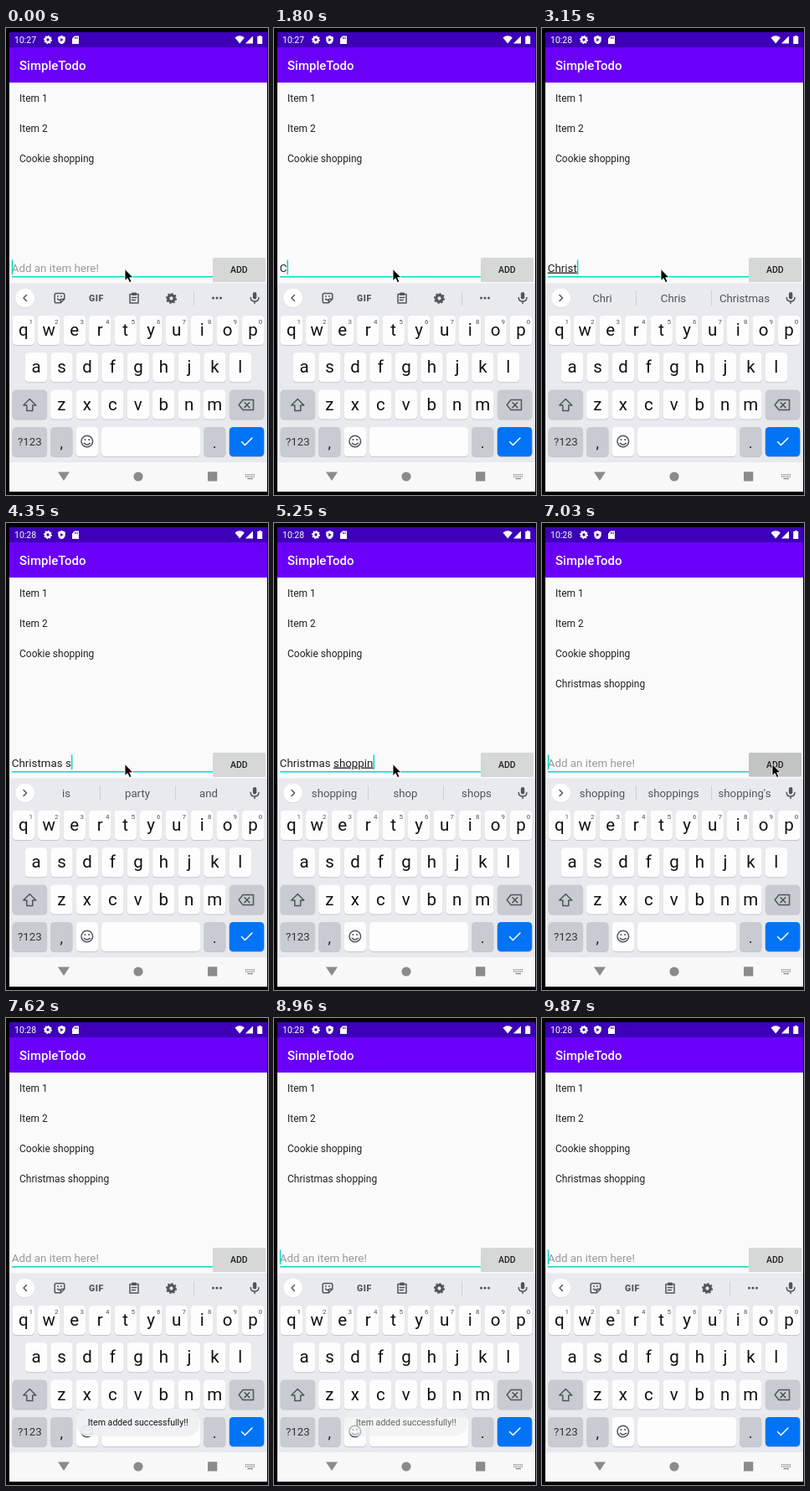
An HTML page for the animation above (9970 ms loop, 313 by 557 pixels).

```html
<!DOCTYPE html>
<html lang="en">
<head>
<meta charset="utf-8">
<title>SimpleTodo</title>
<style>
html, body { margin: 0; width: 100%; height: 100%; overflow: hidden; background: #000; }
svg { display: block; width: 100vw; height: 100vh; font-family: Roboto, "Liberation Sans", sans-serif; }
.mid { text-anchor: middle; }
.line { fill: none; stroke: #50555a; stroke-width: 1.5; stroke-linecap: round; stroke-linejoin: round; }
.u { text-decoration: underline; }
</style>
</head>
<body>
<svg id="stage" viewBox="0 0 313 557"></svg>
<script>
const LOOP = 9970;
const GREY = '#50555a';
const stage = document.getElementById('stage');

// Markup helpers
const rect = (x, y, w, h, fill, r = 0, more = '') =>
  `<rect x="${x}" y="${y}" width="${w}" height="${h}" rx="${r}" fill="${fill}" ${more}/>`;
const text = (x, y, size, s, fill = '#202124', more = '') =>
  `<text x="${x}" y="${y}" font-size="${size}" fill="${fill}" ${more}>${s}</text>`;
const mid = (x, y, size, s, fill, more = '') => text(x, y, size, s, fill, 'class="mid" ' + more);
const path = (d, fill, more = '') => `<path d="${d}" fill="${fill}" ${more}/>`;
const line = (d, more = '') => `<path class="line" d="${d}" ${more}/>`;
const dot = (x, y, r, fill) => `<circle cx="${x}" cy="${y}" r="${r}" fill="${fill}"/>`;
const group = (id, s, more = '') => `<g id="${id}" ${more}>${s}</g>`;
const gear = (x, y, r, color) =>
  `<g fill="none" stroke="${color}"><circle cx="${x}" cy="${y}" r="${r * 0.58}" stroke-width="${r * 0.5}"/>` +
  `<circle cx="${x}" cy="${y}" r="${r * 0.88}" stroke-width="${r * 0.26}" pathLength="16" stroke-dasharray="1"/></g>`;
const key = (x, y, w, fill = '#fdfdfd') =>
  rect(x, y + 1, w, 35, '#c3c6ca', 4.5) + rect(x, y, w, 35, fill, 4.5);

function statusBar() {
  return rect(4, 5, 308, 18, '#3d00b8') +
    text(10, 18, 10.5, '10:27', '#fff', 'id="clock"') +
    gear(50, 14, 5, '#fff') +
    path('M66.5 9l4.3 1.7v3q0 4-4.3 5.6q-4.3-1.6-4.3-5.6v-3z', '#fff') +
    path('M65.2 12l3.4 2.1-3.4 2.1z', '#3d00b8') +
    path('M82 9.5h5v9.5h-8v-6.5z', '#fff') +
    path('M82.3 11v2m1.5-2v2m1.5-2v2', 'none', 'stroke="#3d00b8" stroke-width=".8"') +
    path('M273.5 11.5q5.7-4.4 11.4 0l-5.7 7z', '#fff') +
    path('M295 9.5v9h-9z', '#fff') +
    path('M302 9h2.5v1h1.7v9h-6v-9h1.8z', '#fff');
}

function app() {
  return rect(4, 5, 308, 548, '#fafafa') + statusBar() +
    rect(4, 23, 308, 42, '#6a00f7') +
    rect(4, 65, 308, 1.5, '#000', 0, 'opacity=".09"') +
    text(16, 50, 15, 'SimpleTodo', '#fff', 'font-weight="500"') +
    ['Item 1', 'Item 2', 'Cookie shopping', 'Christmas shopping'].map((s, i) =>
      text(16, 87.6 + 36 * i, 12, s, '#212121', i === 3 ? 'id="added"' : '')).join('') +
    rect(7, 296, 241, 1.5, '#03dac5') +
    text(6.8, 290.5, 13.35, 'Add an item here!', '#999', 'id="hint"') +
    text(6.8, 290.5, 13.35, '', '#212121', 'id="entry"') +
    rect(7, 276.5, 1.5, 17.5, '#03dac5', 0, 'id="caret"') +
    rect(247, 275, 63, 28, '#bbb', 1.5, 'opacity=".6"') +
    rect(247, 274, 63, 28, '#d6d7d7', 1.5, 'id="button"') +
    mid(278.3, 291.7, 10.5, 'ADD', '#212121', 'font-weight="500"');
}

function toolbar() {
  const tools =
    line('M24.5 318.5l-3.5 3.5 3.5 3.5') +
    line('M60 316.5h8q1.8 0 1.8 1.8v5l-4.5 4.5h-5.3q-1.8 0-1.8-1.8v-7.700q0-1.800 1.800-1.800zM69.5 323.300h-2.500q-1.700 0-1.700 1.700v2.500M61.500 323q1.500 2 3.500 1') +
    dot(62, 320, 0.9, GREY) + dot(66, 320, 0.9, GREY) +
    mid(108, 325.8, 10.5, 'GIF', GREY, 'font-weight="900" letter-spacing=".6"') +
    line('M148 317.500h10v10.500h-10zM150.300 321.500h5.400M150.300 324.500h4') +
    rect(150, 315.5, 6, 3.5, GREY, 1) +
    gear(197.5, 322.5, 6.5, GREY) +
    rect(224, 314, 1, 17, '#cdd0d4') +
    [247.5, 252, 256.5].map(x => dot(x, 322, 1.5, GREY)).join('');
  const words =
    line('M21 318.5l3.500 3.500-3.500 3.500') +
    [112, 202].map(x => rect(x, 313, 1, 18, '#cdd0d4')).join('') +
    [72, 157, 242].map(x => mid(x, 327, 13.2, '', GREY, 'data-word')).join('');
  return dot(22.7, 322.7, 11.3, '#d5d8dc') + dot(22.7, 322, 11.3, '#fff') +
    group('tools', tools) + group('words', words) +
    rect(294.9, 315, 4.4, 8.5, GREY, 2.2) +
    line('M292.300 321.500q0 4.500 4.800 4.500t4.800-4.500M297.100 326v2.500');
}

function keyboard() {
  const dark = '#c8ccd2';
  let s = rect(4, 304.5, 308, 213.5, '#e8eaed') + toolbar();
  ['qwertyuiop', 'asdfghjkl', 'zxcvbnm'].forEach((row, r) => {
    const y = 343 + 44.3 * r;
    [...row].forEach((ch, i) => {
      const x = [20.8, 36, 66.3][r] + 30.48 * i;
      s += key(x - 13.2, y, 26.4) + mid(x, y + 24, 20.5, ch, '#111');
      if (!r) s += mid(x + 9, y + 9.5, 8, (i + 1) % 10, GREY);
    });
  });
  s += key(7.6, 431.6, 41.5, dark) + key(266.8, 431.6, 41.5, dark) +
    line('M28.300 442.500l7.500 7.500h-4v6.500h-7v-6.500h-4z') +
    line('M283 443.500h12.500v12h-12.500l-4.800-6zM285 446.800l5.800 5.800m0-5.800l-5.800 5.800') +
    key(7.6, 476, 41.5, dark) + mid(28.3, 498.3, 13.3, '?123', '#333') +
    key(53.1, 476, 26.4, dark) + mid(66.3, 501, 18, ',', '#222') +
    key(83.6, 476, 26.4) +
    '<circle class="line" cx="96.800" cy="493" r="6.800"/>' +
    line('M93.300 495.300q3.500 3.500 7 0') +
    dot(94.4, 491, 1.1, GREY) + dot(99.2, 491, 1.1, GREY) +
    key(114.1, 476, 118) +
    key(236, 476, 26.4, dark) + mid(249.2, 501, 18, '.', '#222') +
    key(266.8, 476, 41.5, '#0074f5') +
    line('M281.500 493.500l4 4 8.500-8.500', 'style="stroke:#fff"');
  return s;
}

function navBar() {
  const c = '#8b8b8b';
  let keys = '';
  for (let i = 0; i < 10; i++) keys += rect(286 + (i % 5) * 2.4, 532 + (i / 5 | 0) * 2.4, 1.4, 1.4, c);
  return rect(4, 518, 308, 35, '#f8f8f9') +
    path('M62 529.500h14l-7 10.500z', c) + dot(158, 535, 5.6, c) +
    rect(241, 529.3, 11.3, 11.3, c, 0.5) + keys + rect(288.5, 536.8, 6.5, 1.4, c);
}

const toast = rect(84, 466, 147, 33, '#eef0f1', 15, 'opacity=".9"') +
  mid(157.7, 485.5, 10.6, 'Item added successfully!!', '#151515');

stage.innerHTML = app() + keyboard() + navBar() + group('toast', toast) +
  group('mouse', path('M0 0v14l3.200-2.900 2.300 5 2.500-1.100-2.300-4.800h4.300z', '#000', 'stroke="#fff" stroke-width=".9"'));

const $ = id => document.getElementById(id);
const slots = [...document.querySelectorAll('[data-word]')];
const show = (id, on) => $(id).setAttribute('visibility', on ? 'visible' : 'hidden');

// Timelines: [start, value]
const typing = [
  [0, ''], [1800, 'C'], [2100, 'Ch'], [2250, 'Chr'], [2400, 'Chri'], [3150, 'Christ'],
  [3750, 'Christma'], [3900, 'Christmas'],
  ...[...'shoppin'].map((_, i) => [4350 + 150 * i, 'Christmas ' + 'shoppin'.slice(0, i + 1)]),
  [5550, 'Christmas shopping'], [7030, '']
];
const hints = [
  [0, ''], [2250, 'ChCh Christmas'], [2550, 'Chri Chris Christmas'],
  [3300, 'Christ Christmas Christian'], [3900, "Christmas Christmases Christmas's"],
  [4350, 'is party and'], [4500, 's so she'], [4650, 'sh she should'],
  [4800, 'sho show should'], [4950, 'shop shopping shops'],
  [5250, 'shopping shop shops'], [5700, "shopping shoppings shopping's"], [7180, '']
];
const blinks = [450, 1050, 1500, 1800, 2850, 3150, 6140, 6440, 6880, 7030, 7470, 7920, 8370, 8810, 9410, 9870];

const at = (list, t) => list.filter(e => e[0] <= t).pop()[1];
const ease = p => p * p * (3 - 2 * p);
// Progress from 0 to 1 in n equal held steps
const held = (t, from, gap, n) => Math.min(1, Math.max(0, Math.floor((t - from) / gap) / n));

function draw(t) {
  const typed = at(typing, t);
  const [, done, word] = typed.match(/^(.* )?(.*)$/);
  $('clock').textContent = t < 2100 ? '10:27' : '10:28';
  $('entry').innerHTML = (done || '') + (word.length > 1 ? `<tspan class="u">${word}</tspan>` : word);
  show('hint', !typed);
  show('added', t >= 7030);
  show('caret', blinks.filter(b => b <= t).length % 2 === 0);
  $('caret').setAttribute('x', 6.8 + (typed ? $('entry').getComputedTextLength() : 0));
  $('button').setAttribute('fill', t >= 6880 && t < 7330 ? '#c2c3c3' : '#d6d7d7');

  const words = at(hints, t);
  show('tools', !words);
  show('words', words);
  slots.forEach((s, i) => s.textContent = words.split(' ')[i] || '');

  const move = ease(held(t, 5550, 147.5, 4));
  $('mouse').setAttribute('transform', `translate(${142 + 133 * move} 287.5)`);
  show('mouse', t < 7180);

  const enter = held(t, 7030, 147, 4);
  const leave = held(t, 8810, 150, 3);
  $('toast').setAttribute('opacity', enter * (1 - leave));
  $('toast').setAttribute('transform', `translate(0 ${37 * (1 - enter) ** 2})`);
}

const start = performance.now();
function frame() {
  draw((performance.now() - start) % LOOP);
  requestAnimationFrame(frame);
}
frame();
</script>
</body>
</html>
```
